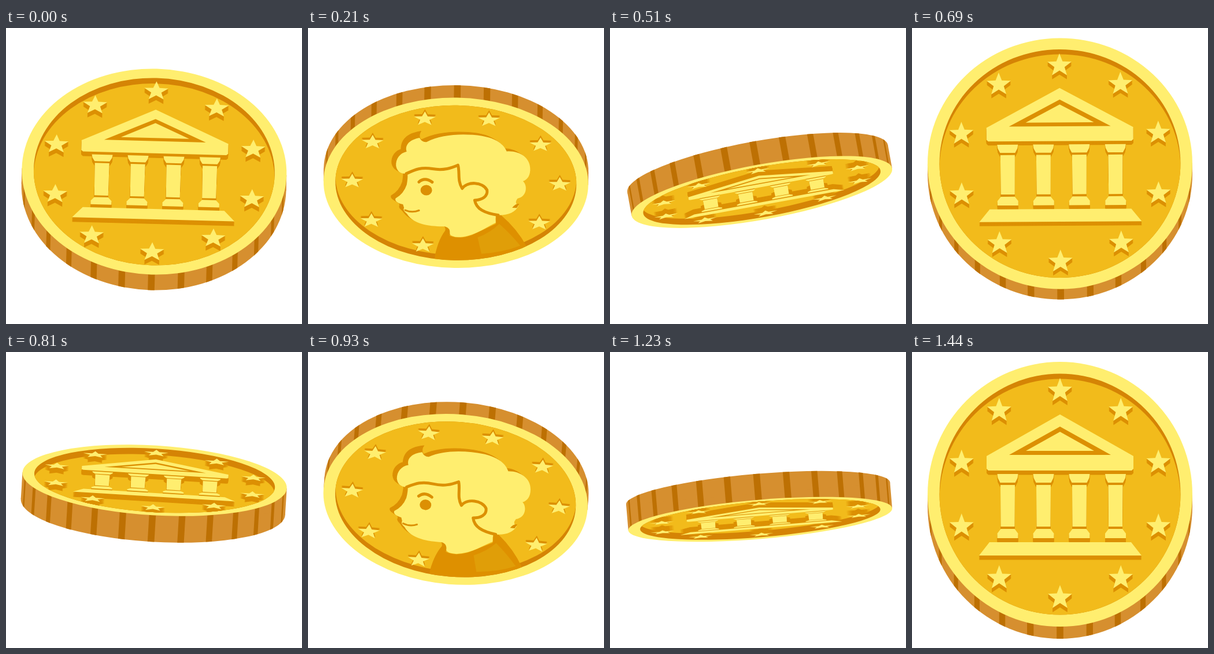
An HTML page with a canvas that plays this animation: 512 by 512 pixels, repeating every 1.47 s.

```html
<!DOCTYPE html>
<html>
<head>
<meta charset="utf-8">
<title>Coin flip</title>
<style>
  html, body { margin: 0; height: 100%; overflow: hidden; background: #fff; }
  canvas { display: block; }
</style>
</head>
<body>
<canvas id="stage" width="512" height="512"></canvas>
<script>
const ctx = document.getElementById('stage').getContext('2d');
const STEP = 30, STEPS = 49, RADIUS = 229, INNER = 208.5, THICKNESS = 46;
const LIGHT = '#ffee6f', GOLD = '#f2bb1b', DARK = '#dc9003', WALL = '#d58405',
      SIDE = '#d68f2f', STRIPE = '#bd7003';
const rad = deg => deg * Math.PI / 180;

// Tracks are [step, value] knots joined by smooth cubics.
const faceAngle = [[-1, 0], [0, 39], [7, 130], [17, 282], [23, 378.6], [31, 490], [41, 638.5], [48, 720], [49, 759]];
const edgeAngle = [[-1, 27], [0, 36], [7, 152], [17, 297], [23, 383], [31, 513], [41, 642], [48, 747], [49, 756]];
const roll = [[-1, 0], [0, 1.5], [7, .9], [17, -10.3], [23, -.3], [31, 4.6], [41, -4.8], [48, 0], [49, 1.5]];
const centreX = [[-1, 256], [0, 256], [7, 256], [17, 259], [23, 256], [31, 256], [41, 258], [48, 256], [49, 256]];
const centreY = [[-1, 256.5], [0, 262], [7, 257], [10.5, 248.5], [17, 263.5], [21.5, 238], [23, 243.5],
  [31, 244.5], [34, 240], [41, 267], [48, 256.5], [49, 262]];

function sample(track, n) {
  let i = 1;
  while (i < track.length - 3 && n >= track[i + 1][0]) i++;
  const slope = (p, q) => (q[1] - p[1]) / (q[0] - p[0]);
  const [before, from, to, after] = track.slice(i - 1, i + 3);
  const span = to[0] - from[0], u = (n - from[0]) / span, v = 1 - u;
  return v * v * (1 + 2 * u) * from[1] + u * u * (3 - 2 * u) * to[1] +
    span * u * v * (v * slope(before, to) - u * slope(from, after));
}

function polygon(path, points, dx = 0, dy = 0) {
  points.forEach(([x, y], i) => path[i ? 'lineTo' : 'moveTo'](x + dx, y + dy));
  path.closePath();
}

function starRing(path, radius, size, startDeg) {
  const star = Array.from({ length: 10 }, (_, i) => {
    const r = i % 2 ? size * .42 : size;
    return [r * Math.sin(i * Math.PI / 5), -r * Math.cos(i * Math.PI / 5)];
  });
  for (let i = 0; i < 10; i++) {
    const a = rad(startDeg + i * 36);
    polygon(path, star, radius * Math.sin(a), -radius * Math.cos(a));
  }
}

const temple = new Path2D();
starRing(temple, 179, 22, 0);
polygon(temple, [[0, -138], [127, -66], [127, -44], [124, -41], [-124, -41], [-127, -44], [-127, -66]]);
polygon(temple, [[-122, 83], [123, 83], [141, 106], [-140, 106]]);
for (const x of [-90.5, -28.5, 33.5, 96]) {
  polygon(temple, [[-18, -35], [18, -35], [17, -28], [13, -20], [-13, -20], [-17, -28]], x);
  polygon(temple, [[-12.5, -16], [12.5, -16], [12, 56], [-12, 56]], x);
  polygon(temple, [[-12, 60], [12, 60], [18, 68], [18, 76], [-18, 76], [-18, 68]], x);
}
const pediment = new Path2D(), pedimentCore = new Path2D();
polygon(pediment, [[0, -117], [88, -68], [-88, -68]]);
polygon(pedimentCore, [[0, -108], [59, -75], [-59, -75]]);

const backStars = new Path2D();
starRing(backStars, 179.5, 20, 18);

// The portrait is laid out in stage units, foreshortened by PORTRAIT_SQUASH.
const PORTRAIT_SQUASH = .64;
const head = new Path2D(`M152 240C151 228 158 218 170 215C166 203 176 194 192 191Q196 199 204 198
  C230 184 268 182 300 186C325 190 338 200 343 212C365 210 383 222 384 240C385 252 380 260 372 263
  C380 270 380 289 363 293Q357 301 365 305C360 317 345 323 326 322Q325 328 326 335
  C305 346 290 358 265 361Q249 361 247 356Q248 345 238 343C215 343 185 342 172 322Q164 316 167 312
  L165 306Q150 303 152 296Q166 288 171 272Q173 260 172 253Q155 255 152 240Z`);
const hairLine = new Path2D(`M170 253C185 246 195 241 215 244S248 242 259 237
  C263 250 258 263 267 277C276 264 302 265 310 279C312 290 302 296 289 297C292 312 306 319 330 322`);
const brow = new Path2D('M192 267Q202 258 215 267');
const mouth = new Path2D('M169 316Q181 321 193 316');
const bust = new Path2D('M222 392Q228 362 242 346L247 359Q264 365 285 357L326 337V322H335Q363 345 380 375L350 420H220Z');
const lapel = new Path2D('M295 361Q318 352 332 337Q352 354 369 374Q340 386 302 389Z');
const tuft = new Path2D('M160 214C158 190 176 182 195 179Q190 186 194 193Z');
const curl = new Path2D('M354 309Q360 301 366 302L362 309Z');

function fill(color, path) { ctx.fillStyle = color; ctx.fill(path); }
function line(path, width) {
  ctx.strokeStyle = DARK;
  ctx.lineWidth = width;
  ctx.stroke(path);
}
function disc(color, r, y, squash) {
  ctx.beginPath();
  ctx.ellipse(0, y, r, r * squash, 0, 0, 7);
  ctx.fillStyle = color;
  ctx.fill();
}

// Dark wall reaching `depth` stage pixels behind the raised shape.
function emboss(path, depth, squash) {
  const count = Math.ceil(Math.abs(depth));
  for (let i = count; i > 0; i--) {
    ctx.save();
    ctx.translate(0, depth * i / count / squash);
    fill(DARK, path);
    ctx.restore();
  }
  fill(LIGHT, path);
}

function drawFront(depth, squash) {
  emboss(temple, depth, squash);
  fill(DARK, pediment);
  fill(LIGHT, pedimentCore);
}

function drawBack(depth, squash) {
  emboss(backStars, depth * .5, squash);
  ctx.scale(1, 1 / PORTRAIT_SQUASH);
  ctx.translate(-256, -267.5);
  fill('#de9000', bust);
  fill('#e09e08', lapel);
  fill(DARK, tuft);
  for (let i = 8; i > 0; i--) {
    ctx.save();
    ctx.translate(-i, -i * .6);
    fill(DARK, head);
    ctx.restore();
  }
  fill(LIGHT, head);
  fill(DARK, curl);
  ctx.lineCap = ctx.lineJoin = 'round';
  line(hairLine, 5);
  line(brow, 5);
  line(mouth, 3);
  ctx.beginPath();
  ctx.ellipse(205, 281, 10, 9, 0, 0, 7);
  ctx.fillStyle = DARK;
  ctx.fill();
}

function drawSide(offset, squash) {
  const half = Math.abs(offset) / 2, facing = Math.sign(offset);
  disc(SIDE, RADIUS, offset / 2, squash);
  ctx.fillRect(-RADIUS, -half, 2 * RADIUS, 2 * half);
  ctx.fillStyle = STRIPE;
  for (let k = -6; k <= 6; k++) {
    const ends = [-1.45, 1.45].map(w => {
      const a = rad(90 + k * 12.95 + w);
      return [RADIUS * Math.cos(a), facing * RADIUS * squash * Math.sin(a)];
    });
    const [[x1, y1], [x2, y2]] = ends;
    ctx.beginPath();
    polygon(ctx, [[x1, y1 - offset / 2], [x2, y2 - offset / 2], [x2, y2 + offset / 2], [x1, y1 + offset / 2]]);
    ctx.fill();
  }
}

function draw(n) {
  const cos = Math.cos(rad(sample(faceAngle, n)));
  const squash = Math.max(Math.abs(cos), .01), front = cos > 0;
  const offset = THICKNESS * Math.sin(rad(sample(edgeAngle, n))) * (front ? 1 : -1);
  const depth = 11 * offset / (Math.abs(offset) + 10);

  ctx.setTransform(1, 0, 0, 1, 0, 0);
  ctx.fillStyle = '#fff';
  ctx.fillRect(0, 0, 512, 512);
  ctx.translate(sample(centreX, n), sample(centreY, n));
  ctx.rotate(rad(sample(roll, n)));
  drawSide(offset, squash);

  ctx.translate(0, -offset / 2);
  disc(LIGHT, RADIUS, 0, squash);
  disc(WALL, INNER, 0, squash);
  ctx.save();
  ctx.clip();
  disc(GOLD, INNER, depth * 1.2, squash);
  ctx.scale(1, squash);
  (front ? drawFront : drawBack)(depth, squash);
  ctx.restore();
}

function tick() {
  draw(Math.floor(performance.now() / STEP) % STEPS);
  requestAnimationFrame(tick);
}
tick();
</script>
</body>
</html>
```
